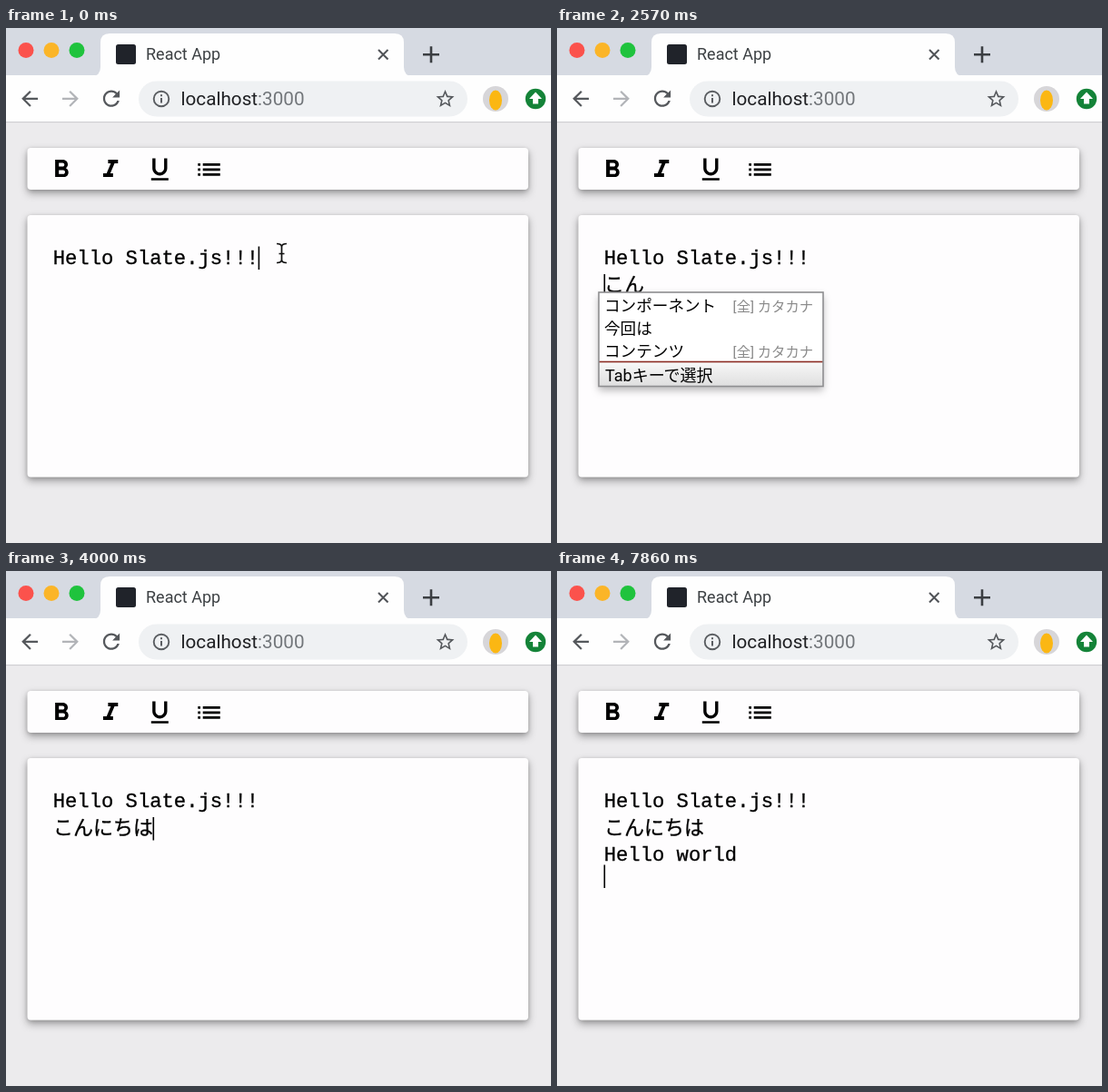
Animation, 600 px wide and 567 px high, one loop 8000 ms. Source, as an HTML page:

```html
<!DOCTYPE html>
<html lang="ja">
<head>
<meta charset="utf-8">
<title>Editor</title>
<style>
  html, body { margin: 0; width: 100%; height: 100%; overflow: hidden; background: #ecebed; }
  svg { display: block; width: 600px; height: 567px; }
  text { white-space: pre; }
  .ui { font-family: Roboto, sans-serif; }
  .doc { font: 22.2px "Liberation Mono", "Noto Sans CJK JP", monospace; stroke: #000; stroke-width: .3; }
  .ime { font: 17.6px Roboto, "Noto Sans CJK JP", sans-serif; }
  .note { font-size: 15.3px; fill: #8a8a8a; text-anchor: end; }
  .card { fill: #fefdfe; filter: drop-shadow(0 1px 2px rgba(0,0,0,.16)) drop-shadow(0 4px 4px rgba(0,0,0,.33)); }
  .popup { filter: drop-shadow(0 4px 4px rgba(0,0,0,.28)); }
</style>
</head>
<body>
<svg viewBox="0 0 600 567">
  <defs>
    <linearGradient id="foot" x2="0" y2="1">
      <stop stop-color="#f8f8f8"/><stop offset="1" stop-color="#dedede"/>
    </linearGradient>
  </defs>

  <!-- browser chrome -->
  <rect width="600" height="567" fill="#ecebed"/>
  <rect width="600" height="53" fill="#d6dae2"/>
  <rect y="52" width="600" height="51" fill="#fefefe"/>
  <rect y="103" width="600" height="1.2" fill="#cfcfd2"/>
  <path d="M94 53q10 0 10-10V16q0-10 10-10H428q10 0 10 10V43q0 10 10 10z" fill="#fefefe"/>
  <circle cx="22" cy="24.5" r="8.5" fill="#fb524c"/>
  <circle cx="50" cy="24.5" r="8.5" fill="#fbb528"/>
  <circle cx="78" cy="24.5" r="8.5" fill="#1fc33d"/>
  <rect x="121" y="18" width="22" height="22" rx="2.5" fill="#20232a"/>
  <text class="ui" x="154" y="35" font-size="18" fill="#3c4043">React App</text>
  <path d="M410 24l10.500 10.500m0-10.500l-10.500 10.500" stroke="#505357" stroke-width="2"/>
  <path d="M459 29.300h18M468 20.300v18" stroke="#3b3e42" stroke-width="2.600"/>

  <rect x="146" y="58.500" width="362" height="39" rx="19.500" fill="#eff1f3"/>
  <path transform="translate(12.700 64.400) scale(1.120)" fill="#55585c" d="M20 11H7.830l5.590-5.590L12 4l-8 8 8 8 1.410-1.410L7.830 13H20z"/>
  <path transform="translate(57.500 64.400) scale(1.120)" fill="#b2b4b8" d="M12 4l-1.410 1.410L16.170 11H4v2h12.170l-5.580 5.590L12 20l8-8z"/>
  <path transform="translate(102.300 64) scale(1.140)" fill="#55585c" d="M17.650 6.350C16.200 4.900 14.210 4 12 4c-4.420 0-8 3.580-8 8s3.580 8 8 8c3.730 0 6.840-2.550 7.730-6h-2.080c-.820 2.330-3.040 4-5.650 4-3.310 0-6-2.690-6-6s2.690-6 6-6c1.660 0 3.140.690 4.220 1.780L13 11h7V4z"/>
  <circle cx="171" cy="78" r="8.300" fill="none" stroke="#5a5d61" stroke-width="1.900"/>
  <path d="M171 77v5.500M171 73.300v2" stroke="#5a5d61" stroke-width="2"/>
  <text class="ui" x="192.500" y="85" font-size="20.700" fill="#202124">localhost<tspan fill="#72767a">:3000</tspan></text>
  <path transform="translate(471.500 66)" fill="#55585c" d="M22 9.240l-7.190-.620L12 2 9.190 8.630 2 9.240l5.460 4.730L5.820 21 12 17.270 18.180 21l-1.630-7.030zM12 15.400l-3.760 2.270 1-4.280-3.320-2.880 4.380-.380L12 6.100l1.710 4.040 4.380.380-3.320 2.880 1 4.280z"/>
  <circle cx="539" cy="78" r="14" fill="#d7d6d9"/>
  <ellipse cx="539" cy="79.500" rx="7" ry="11" fill="#fbb713"/>
  <circle cx="583" cy="78" r="11.200" fill="#148338"/>
  <path d="M583 70.500l7 7.500h-4v5.500h-6V78h-4z" fill="#fff"/>

  <!-- page -->
  <rect class="card" x="23.500" y="132" width="551.500" height="46" rx="4"/>
  <rect class="card" x="23.500" y="206" width="551.500" height="288.500" rx="4"/>
  <g>
    <path transform="translate(44.600 139.600) scale(1.360)" d="M15.600 10.790c.970-.670 1.650-1.770 1.650-2.790 0-2.260-1.750-4-4-4H7v14h7.040c2.090 0 3.710-1.700 3.710-3.790 0-1.520-.860-2.820-2.150-3.420zM10 6.500h3c.830 0 1.500.670 1.500 1.500s-.670 1.500-1.500 1.500h-3zm3.500 9H10v-3h3.500c.830 0 1.500.670 1.500 1.500s-.670 1.500-1.500 1.500z"/>
    <path transform="translate(98.800 139.600) scale(1.360)" d="M10 4v3h2.210l-3.420 8H6v3h8v-3h-2.210l3.420-8H18V4z"/>
    <path transform="translate(153 139.300) scale(1.360)" d="M12 17c3.310 0 6-2.690 6-6V3h-2.500v8c0 1.930-1.570 3.500-3.500 3.500S8.500 12.930 8.500 11V3H6v8c0 3.310 2.690 6 6 6zm-7 2v2h14v-2z"/>
    <path transform="translate(207.200 139.600) scale(1.360)" d="M3 7h2v2H3zm0 4h2v2H3zm0 4h2v2H3zM7 7h14v2H7zm0 4h14v2H7zm0 4h14v2H7z"/>
  </g>

  <!-- document -->
  <text class="doc" x="51.700" y="260">Hello Slate.js!!!</text>
  <text class="doc" id="kana" x="52" y="289.500" style="font-size:22px"></text>
  <text class="doc" id="last" x="51.700" y="318.500"></text>
  <rect id="under" x="53" y="294" height="1.200"/>
  <rect id="caret" width="1.600" height="25.500"/>
  <g id="popups"></g>
  <path id="pointer" fill="none" stroke="#111" stroke-width="1.700"
    d="M298 237.500q5.500 0 5.500 3.500q0-3.500 5.500-3.500M303.500 240v16M300.500 248.500h6M298 258.500q5.500 0 5.500-3.500q0 3.500 5.500 3.500"/>
</svg>
<script>
const $ = id => document.getElementById(id);
const LOOP = 8000, LEFT = 51.5, LATIN = 13.33, KANA = 22;
const GREETING = "こんにちは";

// right edge, then [candidate, note] rows
const candidates = [
  [293, ["コンポーネント", "[全] カタカナ"], ["今回は", ""], ["コンテンツ", "[全] カタカナ"]],
  [243, ["こんにちは", ""], ["こんにちは〜", "ひらがな"]]
];

function popupMarkup([right, ...rows]) {
  const top = 291, rule = top + rows.length * 25 + 1.5, bottom = rule + 27.5;
  const w = right - 46;
  const list = rows.map(([word, note], i) => {
    const y = top + 21 + i * 25;
    return `<text x="52" y="${y}">${word}</text><text class="note" x="${right - 11}" y="${y}">${note}</text>`;
  }).join("");
  return `<g class="ime">
    <rect class="popup" x="46" y="${top}" width="${w}" height="${bottom - top}" fill="#fff"/>
    <rect x="46" y="${rule}" width="${w}" height="${bottom - rule}" fill="url(#foot)"/>
    <rect x="46" y="${rule - .8}" width="${w}" height="1.600" fill="#8b2b22"/>
    <rect x="46" y="${top}" width="${w}" height="${bottom - top - .5}" fill="none" stroke="#8e8e90" stroke-width="1.600"/>
    ${list}<text x="53" y="${rule + 21.5}" font-size="18">Tabキーで選択</text></g>`;
}
$("popups").innerHTML = candidates.map(popupMarkup).join("");
const popups = [...$("popups").children];

// Latest value in a list of [time, value] pairs
const at = (track, t) => track.reduce((value, [start, v]) => t >= start ? v : value, track[0][1]);

const TYPED = [[0, ""], [2000, "ｋ"], [2140, "こ"], [2290, "こｎ"], [2430, "こん"], [2710, "こんｎ"],
  [2860, "こんに"], [3000, "こんにｃ"], [3140, "こんにち"], [3290, "こんにちｈ"], [3430, GREETING]];
const HELLO = [[0, 0], [5290, 1], [5430, 2], [5570, 3], [5710, 4], [5860, 5], [6000, 6],
  [6570, 7], [6710, 8], [6860, 9], [7000, 10], [7140, 11]];
const LINE = [[0, 0], [860, 1], [4860, 2], [7710, 3]];
const POPUP = [[0, -1], [2140, 0], [2860, 1], [3710, -1]];
const BLINK = [[0, 1], [290, 0], [710, 1], [1430, 0], [1860, 1], [4290, 0], [4710, 1]];

const show = (el, on) => el.setAttribute("visibility", on ? "visible" : "hidden");

function render(t) {
  const kana = at(TYPED, t), count = at(HELLO, t), line = at(LINE, t), open = at(POPUP, t);
  const composing = kana && t < 3710;
  $("kana").textContent = kana;
  $("last").textContent = "Hello world".slice(0, count);

  const ends = [17 * LATIN, composing ? 0 : kana.length * KANA, count * LATIN, 0];
  $("caret").setAttribute("x", LEFT + ends[line] - (line ? 0 : .5));
  $("caret").setAttribute("y", [240.5, kana ? 271 : 265.5, 298.5, 323.5][line]);
  show($("caret"), at(BLINK, t));

  $("under").setAttribute("width", Math.max(0, kana.length * KANA - 2));
  show($("under"), composing);
  popups.forEach((p, i) => show(p, i === open));
  show($("pointer"), t < 860);
}

let start;
function tick(now) {
  start ??= now;
  render((now - start) % LOOP);
  requestAnimationFrame(tick);
}
render(0);
requestAnimationFrame(tick);
</script>
</body>
</html>
```
